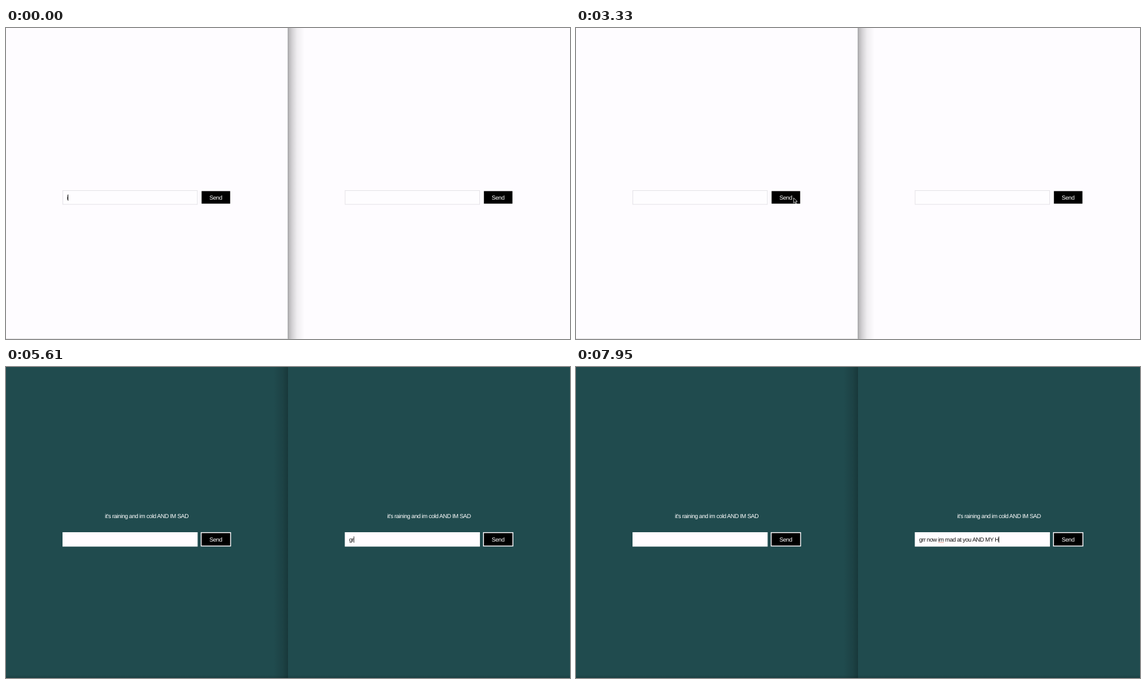
Write an HTML page that moves like this. It is 958 px wide and 529 px high and loops after 8000 ms.

```html
<!DOCTYPE html>
<html lang="en">
<head>
<meta charset="utf-8">
<title>Two chat windows</title>
<style>
  html, body { margin: 0; height: 100%; overflow: hidden; background: #fefcff; }
  svg { display: block; width: 958px; height: 529px; }
  text {
    font: 10px "Liberation Sans", Arial, sans-serif;
    letter-spacing: -.49px;
    white-space: pre;
    text-rendering: geometricPrecision;
  }
  .middle { text-anchor: middle; fill: #fff; }
</style>
</head>
<body>
<svg id="stage" viewBox="0 0 958 529">
  <defs>
    <linearGradient id="lightShade">
      <stop offset="0" stop-opacity=".3"/>
      <stop offset=".25" stop-opacity=".17"/>
      <stop offset=".55" stop-opacity=".06"/>
      <stop offset="1" stop-opacity="0"/>
    </linearGradient>
    <linearGradient id="darkShade">
      <stop offset="0" stop-opacity=".26"/>
      <stop offset=".35" stop-opacity=".12"/>
      <stop offset="1" stop-opacity="0"/>
    </linearGradient>
    <linearGradient id="bottomShade" x2="0" y2="1">
      <stop offset="0" stop-opacity="0"/>
      <stop offset="1" stop-opacity=".16"/>
    </linearGradient>
    <g id="arrow">
      <path d="M0 0V8.6L2 6.8 3.4 10 4.9 9.4 3.5 6.2H6.2Z" stroke="#fff" stroke-width=".8"/>
    </g>
    <g id="beam">
      <path d="M-1.8 -5Q0 -5 0 -4V4Q0 5 -1.8 5M1.8 -5Q0 -5 0 -4M0 4Q0 5 1.8 5" fill="none" stroke="#222" stroke-width=".8"/>
    </g>
  </defs>

  <rect id="page" width="958" height="529"/>
  <g id="lightEdge">
    <rect x="479" width="28" height="529" fill="url(#lightShade)"/>
    <rect x="478.6" width="1" height="529" fill="#959396"/>
    <rect y="528.3" width="479" height="1" fill="#d4d2d5"/>
  </g>
  <g id="darkEdge">
    <rect id="shade" width="25" height="529" fill="url(#darkShade)"/>
    <rect y="524" width="958" height="5" fill="url(#bottomShade)"/>
  </g>
  <g id="windows"></g>
  <use id="pointer"/>
</svg>

<script>
const LOOP = 8000, SENT = 3330, DARK = 3900, FOCUS = 5000;
const TEXT_X = 103.3, MESSAGE = "it's raining and im cold AND IM SAD";
const byId = id => document.getElementById(id);
const show = (node, on) => node.setAttribute('visibility', on ? 'visible' : 'hidden');
const set = (node, attributes) => {
  for (const name in attributes) node.setAttribute(name, attributes[name]);
};

// Bursts of keystrokes: first key time, last key time, keys (\b deletes).
const leftKeys = [
  [0, 0, 'i'],
  [30, 780, "t's raining "],
  [870, 1050, 'and '],
  [1350, 2070, '\b im cold '],
  [2310, 2910, 'AND IM SAD']
];
const rightKeys = [[5505, 7945, 'grr now im mad at you AND MY H']];

function typed(bursts, t) {
  let text = '';
  for (const [start, end, keys] of bursts) {
    const gap = (end - start) / Math.max(1, keys.length - 1);
    [...keys].forEach((key, i) => {
      if (t >= start + gap * i) text = key === '\b' ? text.slice(0, -1) : text + key;
    });
  }
  return text;
}

function makeWindow(offset) {
  const group = document.createElementNS('http://www.w3.org/2000/svg', 'g');
  group.setAttribute('transform', `translate(${offset} 0)`);
  group.innerHTML = `
    <text class="middle message" x="239" y="257">${MESSAGE}</text>
    <g class="form">
      <rect class="field" x="96.5" y="276.5" width="228.5" height="23.5"/>
      <rect x="331.5" y="276.7" width="50" height="22.8" stroke="#fefcff" stroke-width="1.5"/>
      <text class="middle" x="356.3" y="292">Send</text>
      <text class="draft" x="${TEXT_X}" y="292" fill="#111"></text>
      <path class="spelling" fill="none" stroke="#dd7660" stroke-width="1.2" stroke-dasharray="1.2 .8"/>
      <rect class="caret" y="283.2" width=".9" height="10.6" fill="#111"/>
    </g>`;
  byId('windows').append(group);
  const part = name => group.querySelector('.' + name);
  const [message, form, field, draft, spelling, caret] =
    ['message', 'form', 'field', 'draft', 'spelling', 'caret'].map(part);

  return (dark, text, focused, flagged) => {
    show(message, dark);
    set(form, { transform: `translate(0 ${dark ? 5 : 0})` });
    set(field, { fill: dark ? '#fffdff' : '#fefdff', stroke: dark ? '#fffdff' : '#e3e2e6' });
    draft.textContent = text;
    const xAt = n => TEXT_X + (n ? draft.getSubStringLength(0, n) : 0);
    show(caret, focused);
    set(caret, { x: xAt(text.length) - .2 });
    show(spelling, flagged);
    if (flagged) {
      const word = text.indexOf(' im ') + 1;
      set(spelling, { d: `M${xAt(word) + .5} 293.5H${xAt(word + 2)}` });
    }
  };
}

const drawLeft = makeWindow(0), drawRight = makeWindow(479.5);

function progress(t, start, end) {
  const p = Math.min(1, Math.max(0, (t - start) / (end - start)));
  return p * p * (3 - 2 * p);
}

function drawPointer(t) {
  const arrive = progress(t, 3150, 3285), cross = progress(t, 4200, 4950);
  const x = 366 + 3.7 * arrive + 260 * cross;
  const y = 287 + 2 * arrive + 5 * cross;
  const overField = x > 576;
  set(byId('pointer'), {
    href: overField ? '#beam' : '#arrow',
    transform: `translate(${x} ${y})`
  });
  show(byId('pointer'), t >= 3150 && t < rightKeys[0][0]);
}

function draw(t) {
  const dark = t >= DARK, rightFocus = t >= FOCUS;
  set(byId('page'), { fill: dark ? '#204b4e' : '#fefcff' });
  show(byId('lightEdge'), !dark);
  show(byId('darkEdge'), dark);
  // The focused window casts its shadow on the other one.
  set(byId('shade'), { transform: rightFocus ? 'translate(479 0) scale(-1 1)' : 'translate(478.5 0)' });

  const unsent = t < SENT;
  drawLeft(dark, unsent ? typed(leftKeys, t) : '', unsent, unsent && t >= 2250);
  drawRight(dark, typed(rightKeys, t), rightFocus, t >= 6650);
  drawPointer(t);
}

const began = performance.now();
function tick() {
  draw((performance.now() - began) % LOOP);
  requestAnimationFrame(tick);
}
tick();
</script>
</body>
</html>
```
